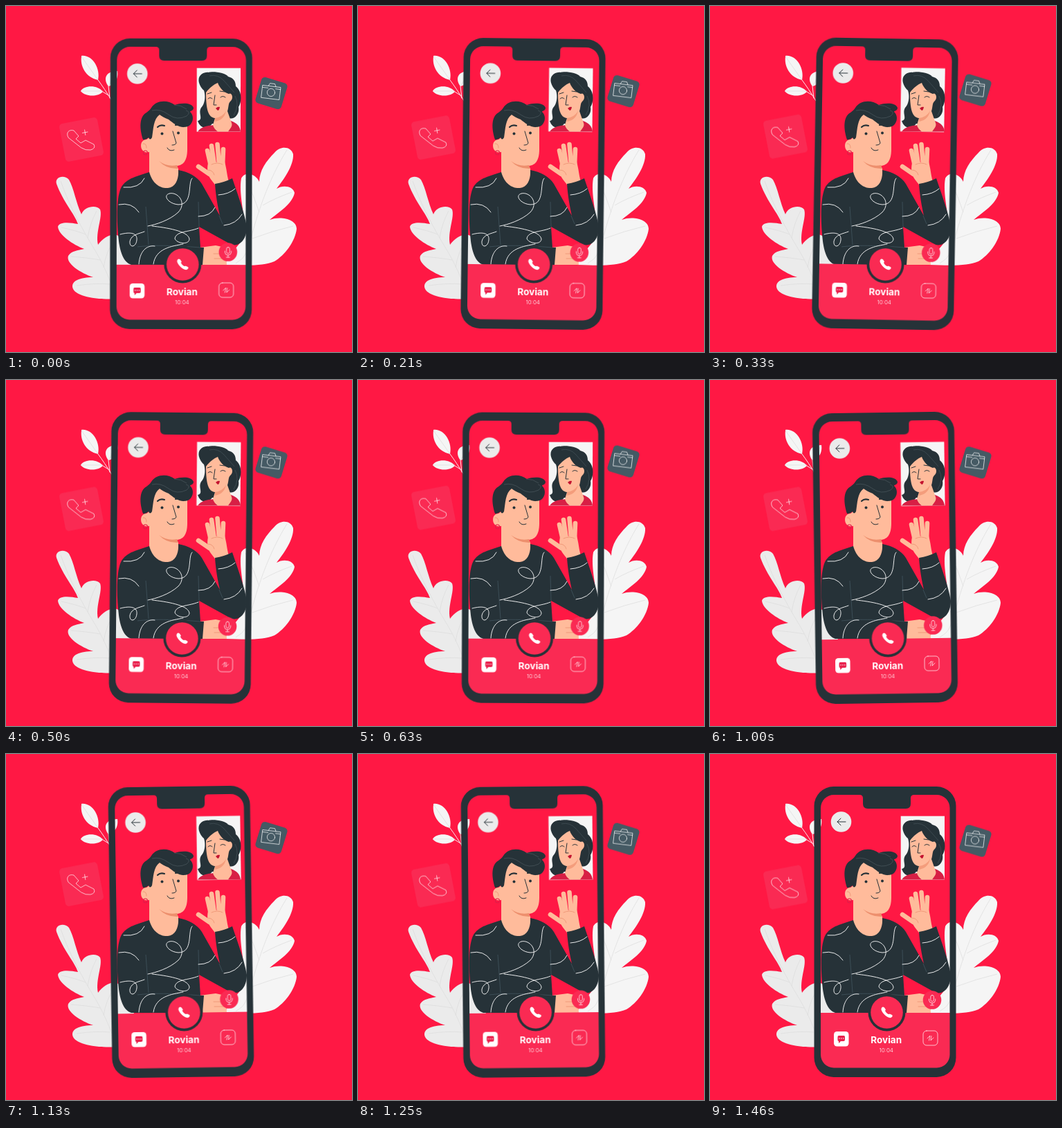
Animation of 500 by 500 pixels, one loop 1500 ms. Source, as an HTML page without scripts:

```html
<!DOCTYPE html>
<html lang="en">
<head>
<meta charset="utf-8">
<title>Video call</title>
<style>
  html, body { margin: 0; width: 100%; height: 100%; overflow: hidden; background: #ff1844; }
  svg { display: block; width: 100vw; height: 100vh; }
  .dark { fill: #263238; }
  .pale { fill: #ebebeb; }
  .light { fill: #f5f5f5; }
  .skin { fill: #ffbb9b; }
  .panel { fill: #fa2a53; }
  .line { fill: none; stroke: #fff; stroke-width: .9; stroke-linecap: round; stroke-linejoin: round; }
  .ink { fill: none; stroke: #263238; stroke-width: 1; stroke-linecap: round; stroke-linejoin: round; }
  .brow { stroke-width: 2.2; }
  .thin { stroke-width: .7; }
  .vein { fill: none; stroke: #dcdcdc; stroke-width: .7; }
  .crease { fill: none; stroke: #e98c6c; stroke-width: .7; stroke-linecap: round; }
  .fingers { fill: none; stroke: #ffbb9b; stroke-width: 6.6; stroke-linecap: round; }
  text { fill: #fff; text-anchor: middle; font-family: Inter, "Open Sans", sans-serif; }

  .phone, .photo { animation: sway 1.5s -.04s linear infinite; }
  .phone { transform-origin: 253px 257px; }
  .photo { transform-origin: 307px 136px; }
  .float { animation: float 1.5s linear infinite; }
  @keyframes sway {
    25% { transform: rotate(1deg); }
    75% { transform: rotate(-1deg); }
  }
  @keyframes float {
    50% { transform: translateY(-10px); }
  }
</style>
</head>
<body>
<svg viewBox="0 0 500 500">
  <rect width="500" height="500" fill="#ff1844"/>

  <g id="leaves">
    <path class="pale" d="M73 257C70 247 84 243 91 251C98 263 101 284 109 301C113 289 131 287 136 294C140 305 129 326 133 345C141 333 158 325 164 334C170 346 178 362 185 374L162 423C140 425 104 422 97 409C92 397 108 392 126 392C108 386 86 372 90 361C94 354 104 353 113 351C97 345 76 331 75 319C77 311 93 313 104 315C99 300 83 284 73 257Z"/>
    <path class="vein" d="M79 253C92 290 110 322 128 352S154 408 160 420M80 320Q103 325 115 330M131 296Q121 315 118 335M94 362Q120 364 136 367M102 404Q130 400 150 402M159 334Q144 355 141 378"/>
    <path class="light" d="M388 212C397 201 412 203 415 214C416 230 402 250 391 264C400 258 415 260 417 270C414 286 394 298 381 309C397 303 420 308 420 322C418 340 403 360 388 369C372 376 348 375 316 374C326 352 340 345 345 330L344 318C345 300 336 270 340 249C346 238 361 243 366 254C366 238 376 224 388 212Z"/>
    <path class="vein" d="M406 208C380 250 365 295 355 332S340 365 332 372M413 269Q388 278 371 288M415 318Q385 325 356 336M346 250Q359 275 366 298"/>
    <path class="light" d="M109 73C107 87 115 103 133 107C137 91 125 70 109 72ZM108 123C113 114 133 114 140 124C132 132 114 131 108 123ZM148 116C140 105 144 94 161 94C163 107 155 115 148 116Z"/>
    <path class="line" d="M133 107Q142 119 153 137M140 124L148 129M148 116L150 133"/>
    <path class="vein" d="M109 73L133 107M108 123H140M161 94L148 116"/>
  </g>

  <g id="inset">
    <rect class="photo light" x="275.700" y="89.700" width="63.300" height="92"/>
    <path class="dark" d="M279 111C276 100 286 95 293 96C300 94 318 97 321 102C329 104 332 109 332 116C340 122 342 136 336 146C338 156 330 165 322 162L313 172L298 170C292 179 281 178 277 166C286 164 277 155 282 147C287 142 289 131 286 122Q281 118 279 111Z"/>
    <path fill="#d81f45" d="M277 181.500C282 174 292 173 300 172L325 166C334 169 338 174 339 181.500Z"/>
    <path class="skin" d="M289 125C294 118 301 113 306 111C309 119 315 125 322 127C326 124 330 133 324 138C321 141 322 146 320 152L326 169C328 174 323 178 321 181.500H306Q300 177 299 172L302 162C292 161 289 149 289 125Z"/>
    <path fill="#f49d7c" d="M302 162Q312 161 318 152Q315 165 302 167Z"/>
    <path class="ink" d="M292 134Q295 131 298 134M310 132Q313 129 317 132M302 129L300 143L304 143M291 127L297 125M309 123L316 124"/>
    <path fill="#c4122f" d="M303 148Q306 145 309 146Q308 151 306 151Z"/>
    <path fill="none" stroke="#4b585e" stroke-width=".6" d="M294 101Q306 98 315 108T330 125M331 130Q338 143 329 158"/>
  </g>

  <g id="caller">
    <path class="skin" d="M207 190L213 156H262V207C262 224 256 231 245 231L249 235V263H207V211C193 215 191 193 203 193Z"/>
    <path fill="#ed8f6d" d="M221 224Q233 233 247 230L249 235Q232 236 221 224Z"/>
    <path class="dark" d="M198 193C193 178 192 160 203 154C207 151 208 150 210 147C217 136 233 135 244 143C253 140 268 139 271 147C271 152 266 151 266 153C273 159 270 171 263 174C251 178 243 170 235 164C229 162 225 159 222 157C213 163 213 178 211 190Q208 195 206 190Q202 194 198 193Z"/>
    <path fill="none" stroke="#4b585e" stroke-width=".7" d="M211 151Q223 148 235 157T261 159Q268 153 260 151M243 143Q253 143 261 149"/>
    <circle class="dark" cx="225.500" cy="184.500" r="2"/>
    <circle class="dark" cx="249" cy="183.500" r="2"/>
    <path class="ink brow" d="M219 175Q223 171 229 173M245 172Q251 170 256 174"/>
    <path class="ink" d="M241 181L246 198Q245 201 240 201M233 205Q236 211 243 208"/>
    <path class="crease" d="M198 199Q203 198 203 205"/>
    <circle cx="201.500" cy="212" r="3" fill="none" stroke="#e31b48" stroke-width="1.200"/>

    <path class="fingers" d="M296 231L291 209M301 229L297 202M308 229L305.500 200M313 230L314 207M294 243L278 232"/>
    <path class="skin" d="M292 227L316 225C319 236 319 243 322 254L303 260C299 252 288 247 292 227Z"/>
    <path class="crease" d="M292 237Q299 237 301 244M297 229Q306 225 313 229"/>
    <path class="skin" d="M280 349L303 346Q316 348 318 355L319 374H280Z"/>
    <path class="crease" d="M300 358H314M301 365H315"/>

    <path class="dark" d="M207 240C212 258 224 264 234 263C245 262 250 250 249 237C264 240 276 246 283 257L309 303C306 290 303 273 302 257Q315 255 327 249C335 273 344 296 348 319C348 337 338 348 326 345L279 319L281 349H286L284 374H181C169 370 165 354 163 340C160 314 159 279 166 263C174 248 191 246 207 240Z"/>
    <path fill="none" stroke="#455a64" stroke-width=".7" d="M202 290L206 345M278 283L279 319M308 303L313 315M190 348Q220 344 281 349"/>
    <path class="line" d="M170 262Q193 264 200 249M163 287Q182 283 192 298M269 249C262 256 271 287 249 287C235 286 226 274 236 271C248 268 262 284 249 298C236 310 216 316 205 318M165 330C180 326 190 328 189 338C188 349 178 350 179 340C181 330 193 329 200 326M211 318C230 320 264 325 265 337C264 346 246 343 244 336C246 325 264 327 278 321M192 373C193 355 203 345 215 347M213 373C216 350 240 347 256 344M278 304Q296 304 302 291M307 273Q322 272 331 264M315 317Q333 315 341 301"/>
  </g>

  <g class="phone">
    <path class="panel" d="M160 374H347V440Q346 454 332 454H175Q161 453 160 440Z"/>
    <path class="dark" fill-rule="evenodd" d="M178.500 47H327.500A28 28 0 0 1 355.500 75V439A28 28 0 0 1 327.500 467H178.500A28 28 0 0 1 150.500 439V75A28 28 0 0 1 178.500 47ZM179 59A19 19 0 0 0 160 78V434.500A19 19 0 0 0 179 453.500H327.500A19 19 0 0 0 346.500 434.500V78A19 19 0 0 0 327.500 59H295Q290 59 290 64V72Q290 79 283 79H228Q221 79 221 72V64Q221 59 216 59Z"/>
    <circle class="pale" cx="189.500" cy="98" r="14.800"/>
    <path class="ink" d="M196 98H184M189 93L184 98L189 103"/>

    <circle class="dark" cx="255.500" cy="373.500" r="27"/>
    <circle class="panel" cx="255.500" cy="373.500" r="23.300"/>
    <path fill="#fff" d="M247.500 368Q249 364 252 366.500L254 369.500Q252 371 255 374Q258 377 259.500 375.500L263 377Q265 379 261.500 381Q257 382 251.500 376Q247 371 247.500 368Z"/>

    <circle class="panel" cx="321" cy="355.500" r="13.300"/>
    <g class="line thin">
      <rect x="318.800" y="348.500" width="4.600" height="9" rx="2.300"/>
      <path d="M316.500 354V356Q317 360 321 360T325.700 356V354M321 360V363M318.500 363H323.500"/>
      <rect x="308" y="400" width="21" height="21" rx="5"/>
      <path d="M316.500 414L318 407L314 411M320 407.500L319 414L323 410"/>
    </g>

    <rect fill="#fff" x="179" y="401" width="21.500" height="21.500" rx="4.500"/>
    <path fill="#e91e4b" d="M186 407H193.500Q195 407 195 409V413Q195 415 193 415H189L186 418V415Q184.500 415 184.500 413V409Q184.500 407 186 407Z"/>
    <path d="M187 411H193" stroke="#fff" stroke-width="1.500" stroke-linecap="round" stroke-dasharray="0 2.900"/>

    <text x="254.700" y="418" font-size="13.500" font-weight="700">Rovian</text>
    <text x="254.700" y="431" font-size="8" font-weight="300">10:04</text>
  </g>

  <g class="float">
    <rect class="panel" x="81" y="165" width="56" height="56" rx="5" transform="rotate(-11 109 193)"/>
    <path class="line thin" d="M90 190C86 183 91 178 98 180L105 188L101 192L108 198L115 194L127 200Q130 206 122 208Q115 209 109 205ZM110.500 183.500L118 182M113.600 179L114.800 186.500"/>
  </g>
  <g class="float">
    <rect fill="#455a64" x="364" y="106.500" width="39" height="39" rx="5" transform="rotate(17 383.500 126)"/>
    <g class="line thin" transform="rotate(7 383 125)">
      <path d="M370 116H396V134H370ZM378 116L380 112H387L389 116M370 119H378M389 119H396"/>
      <circle cx="383" cy="125" r="5.600"/>
    </g>
  </g>
</svg>
</body>
</html>
```
